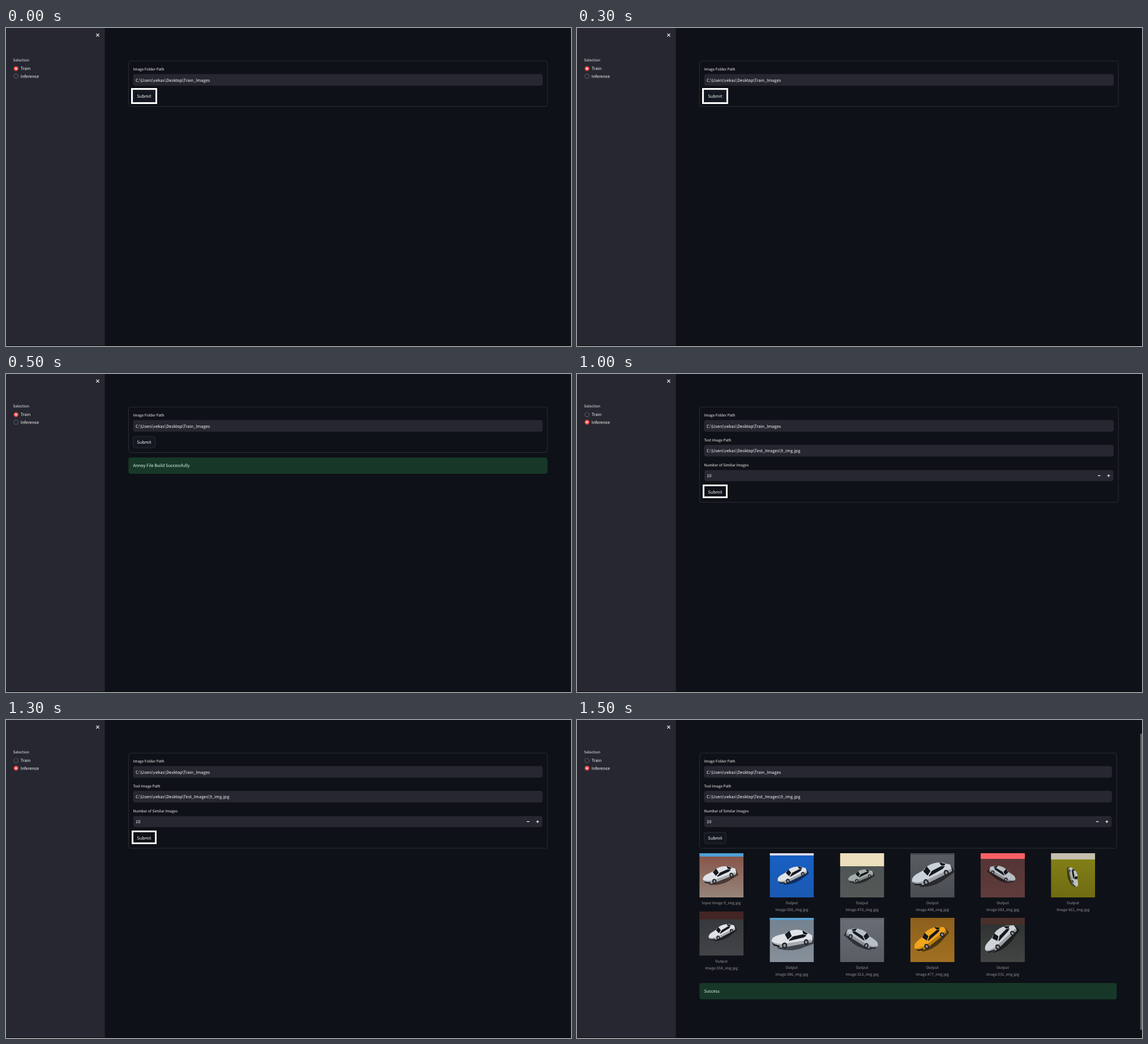
Recreate the animation shown at these times as an HTML page. Size 998 by 561 pixels, loop 2 s.

```html
<!DOCTYPE html>
<html lang="en">
<head>
<meta charset="utf-8">
<title>Image search app</title>
<style>
  html, body { margin: 0; width: 100%; height: 100%; overflow: hidden; background: #0e1117; }
  svg { display: block; width: 998px; height: 561px; }
  text {
    font: 7.45px "Noto Sans CJK JP", "Noto Sans CJK SC", "Noto Sans CJK", "Open Sans", sans-serif;
    fill: #fafafa;
    text-rendering: geometricPrecision;
  }
  .label { font-size: 6.52px; }
  .caption { font-size: 6.52px; fill: #9c9da0; text-anchor: middle; }
  .alert { fill: #dffde9; }
  .field { fill: #262730; }
  .outline { fill: none; stroke: #3d4045; stroke-width: .6; }
  .button { fill: #131720; stroke: #3d4045; stroke-width: .6; }
  .icon { fill: none; stroke: #fafafa; stroke-width: 1.2; }
  .focus { fill: none; stroke: #fff; stroke-width: 3; }
  .scene { visibility: hidden; animation: show 2s step-end infinite; }
  @keyframes show {
    0% { visibility: visible; }
    25%, 100% { visibility: hidden; }
  }
</style>
</head>
<body>
<svg id="stage" viewBox="0 0 998 561"></svg>
<script>
const FOLDER = "C:\\Users\\vekas\\Desktop\\";

const rect = (x, y, w, h, attrs) => `<rect x="${x}" y="${y}" width="${w}" height="${h}" ${attrs}/>`;
const text = (x, y, str, cls = "") => `<text x="${x}" y="${y}" class="${cls}">${str}</text>`;
const icon = (d) => `<path class="icon" d="${d}"/>`;

const radio = (y, name, on) =>
  `<circle cx="17.7" cy="${y}" r="4.2" fill="${on ? "#ff4b4b" : "#7b7b81"}"/>
   <circle cx="17.7" cy="${y}" r="${on ? 1.6 : 3.5}" fill="${on ? "#fff" : "#262730"}"/>` +
  text(25.8, y + 2.8, name);

const radios = (picked) => ["Train", "Inference"]
  .map((name, i) => radio(71.6 + 13.4 * i, name, i === picked)).join("");

// inset trims the field on every side
const input = (y, label, value, right, inset = 0) =>
  text(224.5, y - 6, label, "label") +
  rect(224.5 + inset, y + inset, right - 224.5 - 2 * inset, 20.6 - 2 * inset, 'rx="4" class="field"') +
  text(229.1, y + 13.3, value);

const form = (bottom, right) =>
  rect(216.5, 58.3, right - 216.5, bottom - 58.3, 'rx="4" class="outline"');

const submit = (y, boxed) =>
  (boxed ? "" : rect(224.7, y, 38.7, 20, 'rx="4" class="button"')) +
  text(231.3, y + 12.8, "Submit");

const alertBar = (y, right, message) =>
  rect(216.3, y, right - 216.3, 28.8, 'rx="4" fill="#173828"') +
  text(224.5, y + 17.2, message, "alert");

const trainForm = () =>
  radios(0) + form(138.5, 956.3) +
  input(81.2, "Image Folder Path", FOLDER + "Train_Images", 948);

function searchForm(right) {
  const plus = right - 17.3, minus = plus - 16.7;
  return radios(1) + form(226.3, right) +
    input(81.2, "Image Folder Path", FOLDER + "Train_Images", right - 8.3) +
    input(125, "Test Image Path", FOLDER + "Test_Images\\9_img.jpg", right - 8.3) +
    input(169, "Number of Similar Images", "10", right - 8.3, 0.5) +
    icon(`M${minus - 2.3} 179.4h4.6M${plus - 2.3} 179.4h4.6M${plus} 177.1v4.6`);
}

const wheel = (x, y, r) =>
  `<ellipse cx="${x}" cy="${y}" rx="${r}" ry="${r * 1.2}" fill="#1d2025"/>
   <ellipse cx="${x}" cy="${y}" rx="${r * 0.5}" ry="${r * 0.65}" fill="#8c9197"/>`;

// Toy coupe, 60 units long, nose to the left.
const car = (x, y, size, angle, flip, paint) =>
  `<g transform="translate(${x} ${y}) rotate(${angle}) scale(${size * flip} ${size})">
    <path fill="#000" opacity=".5" d="M-27 6L-20 14Q-4 19 12 15L33 8L31-2Z"/>
    <path fill="${paint}" d="M-30 2Q-29-4-20-6L-10-8Q-1-14 9-13Q20-12 25-7L30-4Q31 2 29 6L-12 12Q-28 12-30 2Z"/>
    <path fill="#000" opacity=".25" d="M-12 12L29 6V2L-13 7Q-24 7-30 2Q-28 12-12 12Z"/>
    <g fill="#15191e">
      <path d="M-10-7L-3-12L0-4L-6 1Z"/>
      <path d="M-4 1.5L2-3.5L17-6L22-4L18-1.5L-4 3Z"/>
      <path d="M16-12L24-7L21-5L17-7Z"/>
      <path d="M-29.5 4L-27 9L-18 11.5V9.5L-26 7Z"/>
    </g>
    ${wheel(-11, 9.5, 3.8)}${wheel(21, 5.5, 3.5)}
  </g>`;

const WHITE = "#dfe3e8";
// name, strip colour, strip height, ground top, ground bottom, car
const photos = [
  ["9", "#519fd6", 6, "#875145", "#96857b", [35, 38, 1, -13, 1, WHITE]],
  ["500", "#ded6ee", 4, "#1760c4", "#1b59b2", [39, 38, .9, -18, 1, WHITE]],
  ["470", "#ebdfbd", 23, "#4c5252", "#545958", [36, 40, .75, -14, 1, "#a3aeac"]],
  ["498", "#45484d", 3, "#595c61", "#4a4d51", [37, 36, 1.22, -18, 1, "#ccd2da"]],
  ["583", "#fb6066", 10, "#523434", "#603c3b", [39, 36, .82, 22, -1, "#b9bec5"]],
  ["422", "#c4bfae", 11, "#858218", "#6f6b11", [40, 42, .6, 68, -1, "#bcc2bb"]],
  ["558", "#432523", 14, "#34373a", "#424448", [39, 36, .82, -20, 1, WHITE]],
  ["386", "#579fce", 4, "#74818e", "#87919b", [39, 37, 1.2, -2, 1, WHITE]],
  ["313", "#5c616a", 3, "#686d76", "#595e65", [40, 36, 1, 23, -1, "#b8bfc9"]],
  ["477", "#8a5d1c", 3, "#8c601d", "#a17022", [34, 36, 1.06, -30, 1, "#f1a51a"]],
  ["531", "#49302b", 12, "#2c302f", "#424543", [34, 36, 1.1, -36, 1, "#ced3d8"]],
];

function photo([name, strip, height, top, bottom, carArgs], i) {
  const x = 216.2 + 124.2 * (i % 6);
  const y = i < 6 ? 235 : i === 6 ? 337.7 : 349;
  const file = `${name}_img.jpg`;
  const lines = i ? ["Output", "Image:" + file] : ["Input Image:" + file];
  return `<linearGradient id="ground${i}" x2="0" y2="1">
      <stop stop-color="${top}"/><stop offset="1" stop-color="${bottom}"/></linearGradient>
    <g transform="translate(${x} ${y})">
      <g clip-path="url(#tile)">
        ${rect(0, 0, 78, 78, `fill="url(#ground${i})"`)}
        ${rect(0, 0, 78, height, `fill="${strip}"`)}
        ${car(...carArgs)}
      </g>
      ${lines.map((line, n) => text(39, 90.3 + 11.7 * n, line, "caption")).join("")}
    </g>`;
}

const scenes = [
  trainForm() + submit(110.3) + rect(222.5, 107.5, 43, 25, 'class="focus"'),
  trainForm() + submit(110.3) + alertBar(147.2, 956.5, "Annoy File Build Successfully"),
  searchForm(956.3) + submit(198.2, true) + rect(223.5, 196.5, 41, 21, 'class="focus"'),
  searchForm(953.2) + submit(198.2) + photos.map(photo).join("") +
    alertBar(463.9, 953.3, "Success") +
    rect(994.9, 24, 3.1, 522.5, 'fill="#5f6165"'),
];

document.getElementById("stage").innerHTML =
  `<clipPath id="tile">${rect(0, 0, 78, 78, "")}</clipPath>` +
  rect(0, 0, 998, 561, 'fill="#0e1117"') +
  rect(0, 0, 174.6, 561, 'fill="#262730"') +
  rect(0, 560, 998, 1, 'fill="#000" opacity=".6"') +
  icon("M159.4 9.9l5.2 5.2m0-5.2l-5.2 5.2") +
  text(12.6, 58.7, "Selection", "label") +
  scenes.map((scene, i) =>
    `<g class="scene" style="animation-delay:${i * 500 - 2000}ms">${scene}</g>`).join("");
</script>
</body>
</html>
```
